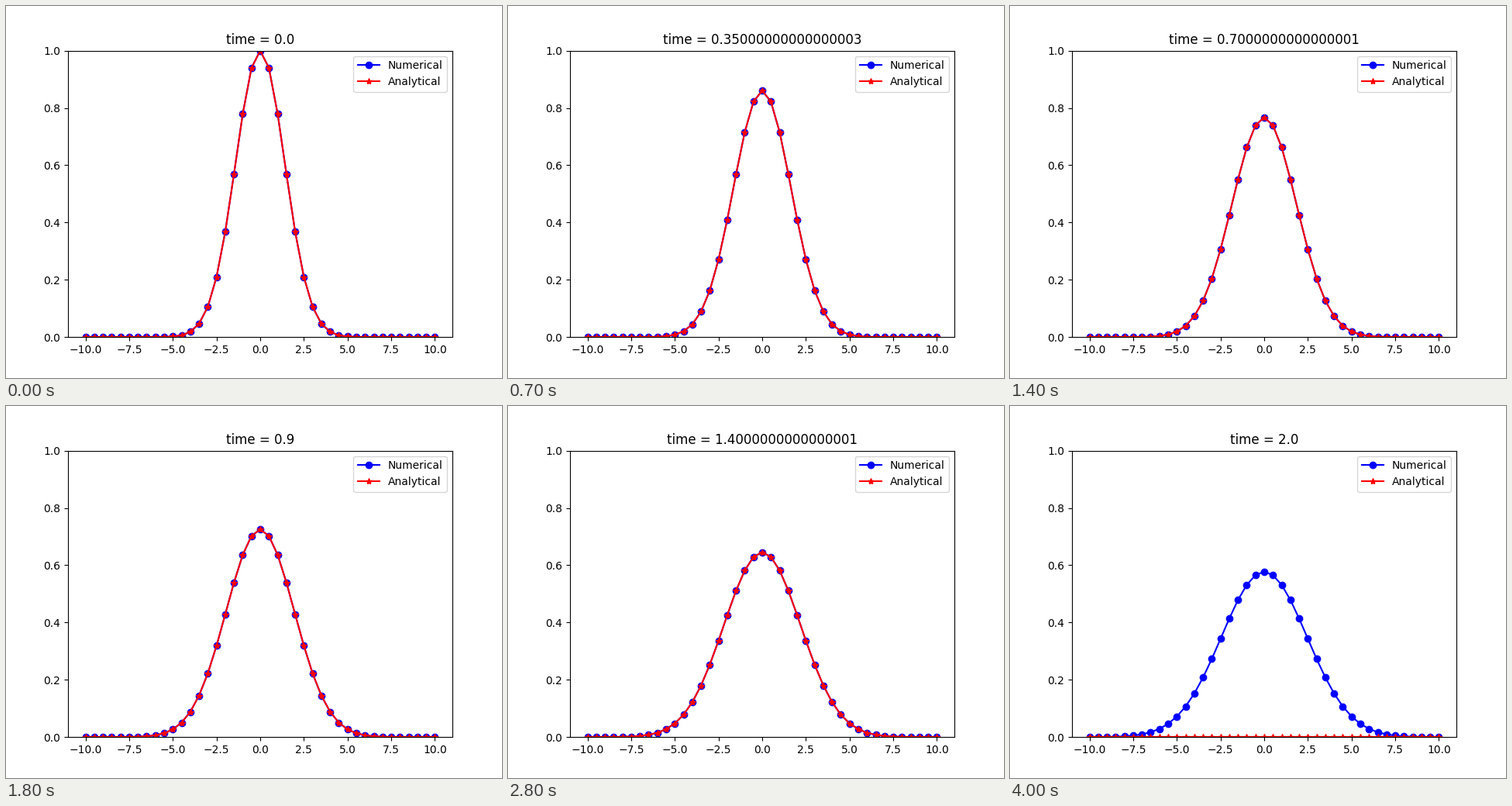
A matplotlib script for the animation above (4.1 s loop, 640 px wide and 480 px high).

```python
import numpy as np
import matplotlib.pyplot as plt
from matplotlib.animation import FuncAnimation

STEPS = 41
DT = 0.05

x = np.linspace(-10, 10, 41)


def heat(t):
    """Gaussian pulse spreading by diffusion."""
    return np.exp(-x**2 / (4 * (1 + t))) / np.sqrt(1 + t)


fig, ax = plt.subplots(figsize=(6.4, 4.8), dpi=100)
numerical, = ax.plot(x, heat(0), "b-o", label="Numerical")
analytical, = ax.plot(x, heat(0), "r-*", label="Analytical")
ax.set_ylim(0, 1)
ax.legend(loc="upper right")
title = ax.set_title("time = 0.0")


def update(i):
    t = i * DT
    u = heat(t)
    numerical.set_ydata(u)
    # the analytical series has no values for the last step
    analytical.set_ydata(u if i < STEPS - 1 else np.zeros_like(x))
    title.set_text(f"time = {t}")
    return numerical, analytical, title


anim = FuncAnimation(fig, update, frames=STEPS, interval=100,
                     init_func=lambda: update(0), repeat=True, repeat_delay=0)
plt.show()
```
